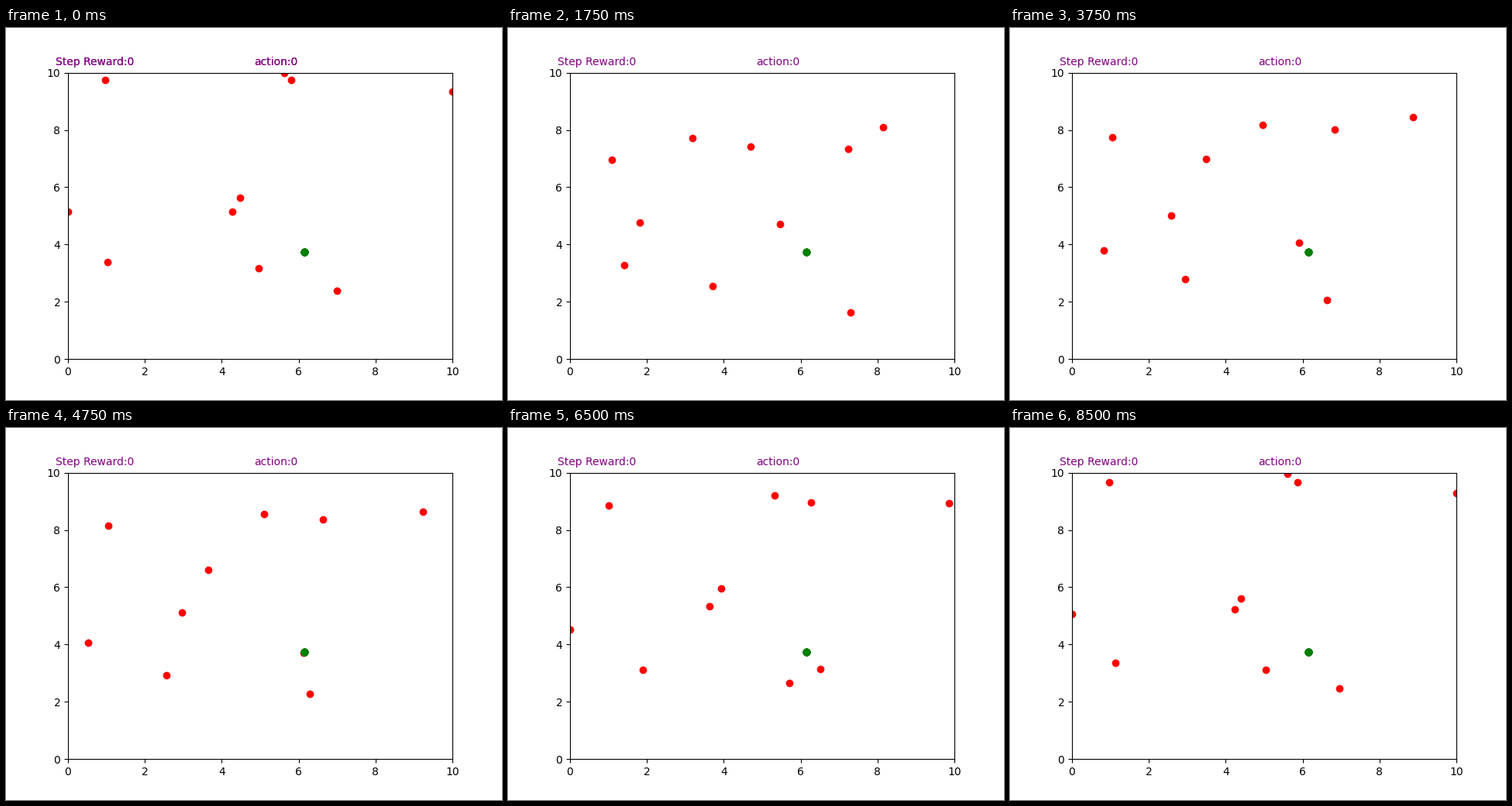
Recreate the animation shown at these times as a matplotlib script. Size 640x480 px, loop 8.75 s.

```python
import numpy as np
import matplotlib.pyplot as plt
from matplotlib.animation import FuncAnimation

FRAMES = 35
INTERVAL = 250
SIZE = 10
SPEED = 0.1
AGENT = (6.15, 3.74)

# Each ball flies straight: start x, start y, heading in degrees.
x0, y0, heading = np.transpose([
    (1.120, 6.256, 92.4), (1.155, 4.543, 18.0),
    (1.935, 2.801, 138.2), (2.909, 8.360, -67.0),
    (4.466, 6.755, 70.6), (7.600, 6.734, 120.7),
    (7.521, 7.790, 26.2), (5.078, 5.304, -56.6),
    (4.374, 2.347, 162.6), (7.880, 1.237, 146.6),
])
angle = np.radians(heading)

fig, ax = plt.subplots(figsize=(6.4, 4.8), dpi=100)
ax.set_xlim(0, SIZE)
ax.set_ylim(0, SIZE)
balls, = ax.plot([], [], "o", color="red")
agent, = ax.plot([], [], "o", color="green")


def add_labels():
    return [fig.text(x, 0.9, label, color="purple")
            for x, label in ((0.1, "Step Reward:0"), (0.5, "action:0"))]


add_labels()
overlay = add_labels()


def update(frame):
    # The loop opens on the last step of the run, its labels drawn twice.
    step = frame or FRAMES
    dist = SPEED * step
    balls.set_data(np.clip(x0 + dist * np.cos(angle), 0, SIZE),
                   np.clip(y0 + dist * np.sin(angle), 0, SIZE))
    # The agent is stamped once more each step, which hardens its edge.
    agent.set_data([AGENT[0]] * step, [AGENT[1]] * step)
    for label in overlay:
        label.set_visible(frame == 0)
    return [balls, agent, *overlay]


anim = FuncAnimation(fig, update, frames=FRAMES, interval=INTERVAL,
                     repeat=True, repeat_delay=0)
plt.show()
```
